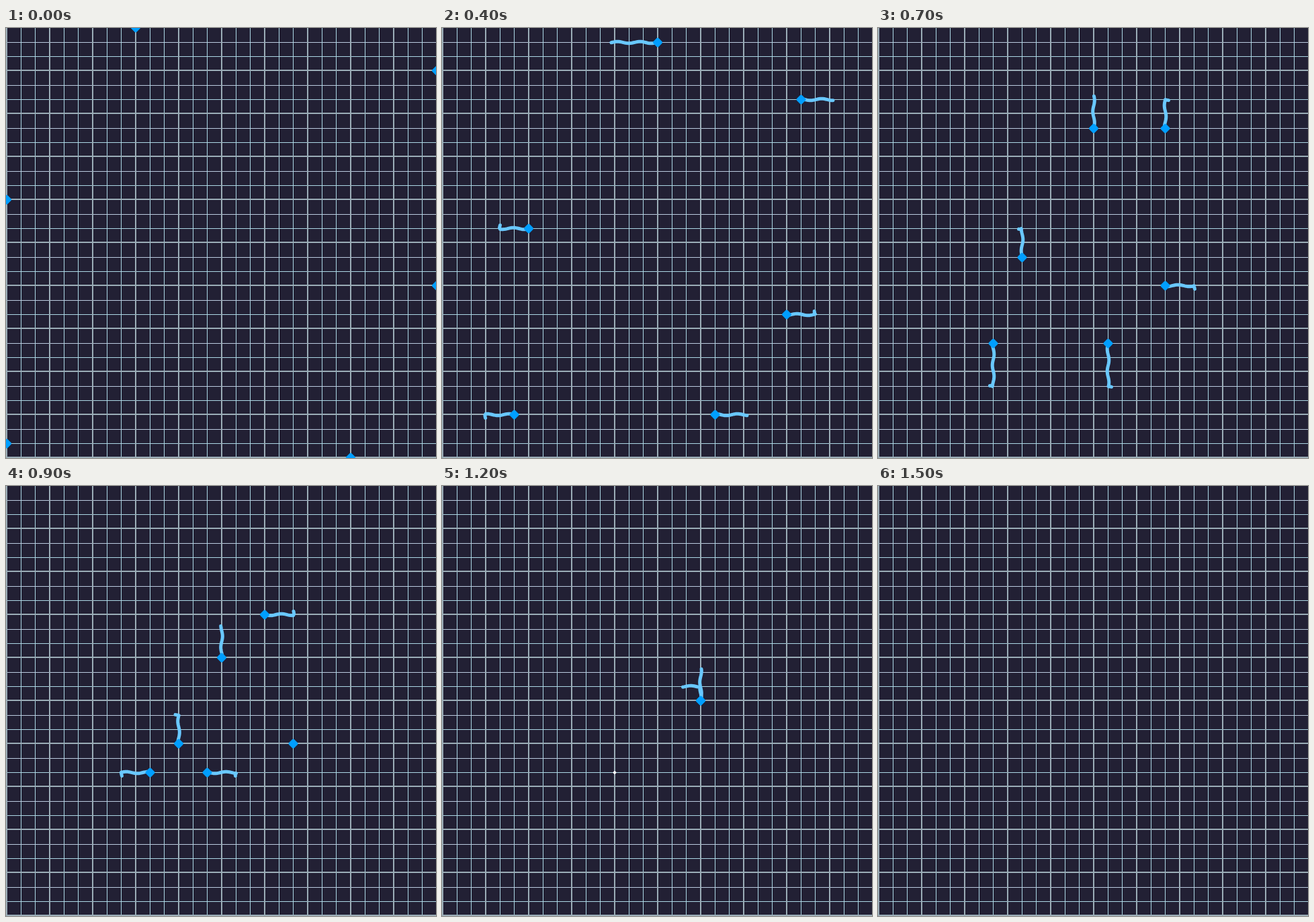
An HTML page with a canvas for the animation above (1600 ms loop, 640 px wide and 640 px high).

```html
<!DOCTYPE html>
<html>
<head>
<meta charset="utf-8">
<style>
html, body { margin: 0; overflow: hidden; background: #222034; }
canvas { display: block; }
</style>
</head>
<body>
<canvas id="stage" width="640" height="640"></canvas>
<script>
const ctx = document.getElementById('stage').getContext('2d');
const CELL = 64 / 3, STEP = 100, STEPS = 16;
const DIRS = { L: [-1, 0], R: [1, 0], U: [0, -1], D: [0, 1] };

// Start cell, one move per step, and the step at which the runner disappears.
const runners = [
  [9, 0, 'D1 R2 R1 R3 D2 D2 D2 D3 D2 D2 R2 R1D1', 13],
  [30, 3, 'D2 L1 L2 L2 L3 L2 D2 D2 L2 D2 D2 D2', 13],
  [0, 12, 'R2 R2 D2 R2 R2 R2 D2 R2 D2 D2', 11],
  [30, 18, 'L2 L2 D2 L2 L2 U2 L2', 10],
  [0, 29, 'R1 R2 U2 R2 U2 R3 U3 U2 R2 R2', 11],
  [24, 30, 'U3 L1 L2 L2 U2 L3 U3 U2 L2 L2', 11]
].map(([col, row, moves, end]) => {
  const points = [toPixel(col, row)];
  const heads = [0];
  for (const move of moves.split(' ')) {
    for (const [, dir, count] of move.matchAll(/([LRUD])(\d)/g)) {
      col += DIRS[dir][0] * count;
      row += DIRS[dir][1] * count;
      points.push(toPixel(col, row));
    }
    heads.push(points.length - 1);
  }
  return { points, heads, end };
});

// Column, row, first step, number of steps shown.
const sparks = [[20, 18, 10, 1], [12, 20, 11, 2], [18, 15, 13, 2]];

function toPixel(col, row) {
  return [
    Math.floor(col * CELL + 1e-6) + (col % 3 ? 1.5 : 1),
    Math.floor(row * CELL + 1e-6) + (row % 3 ? 0.5 : -0.5)
  ];
}

function drawGrid() {
  ctx.fillStyle = '#222034';
  ctx.fillRect(0, 0, 640, 640);
  for (let i = 0; i <= 30; i++) {
    if (i % 3 === 0) continue;
    const at = Math.floor(i * CELL);
    ctx.fillStyle = i % 3 === 1 ? '#bccbe0' : '#add8e6';
    ctx.fillRect(0, at, 640, 1);
    ctx.fillStyle = '#add8e6';
    ctx.fillRect(at + 1, 0, 1, 640);
  }
  ctx.fillStyle = '#9badb7';
  for (let at = 0; at <= 640; at += 64) {
    ctx.fillRect(0, at - 2, 640, 2);
    ctx.fillRect(at, 0, 2, 640);
  }
}

function diamond([x, y], size, round, color) {
  ctx.beginPath();
  ctx.moveTo(x, y - size);
  ctx.lineTo(x + size, y);
  ctx.lineTo(x, y + size);
  ctx.lineTo(x - size, y);
  ctx.closePath();
  ctx.fillStyle = ctx.strokeStyle = color;
  ctx.lineWidth = round * 2;
  ctx.fill();
  ctx.stroke();
}

function drawTrail({ points, heads }, step, seed) {
  const path = points.slice(heads[step - 1], heads[step] + 1);
  const before = points[heads[step - 1] - 1];
  if (before) {
    const [x, y] = path[0], dx = before[0] - x, dy = before[1] - y;
    const k = 5 / Math.hypot(dx, dy);
    path.unshift([x + dx * k, y + dy * k]);
  }
  ctx.beginPath();
  let travelled = 0;
  for (let i = 1; i < path.length; i++) {
    const [ax, ay] = path[i - 1], [bx, by] = path[i];
    const length = Math.hypot(bx - ax, by - ay);
    const ux = (bx - ax) / length, uy = (by - ay) / length;
    for (let d = 0; d <= length; d += 2) {
      const wave = 1.3 * Math.sin((travelled + d) * 0.19 + seed * 1.7 + step * 2.3);
      ctx.lineTo(ax + ux * d - uy * wave, ay + uy * d + ux * wave);
    }
    travelled += length;
  }
  ctx.strokeStyle = '#69c8ff';
  ctx.lineWidth = 5;
  ctx.stroke();
}

function draw(step) {
  ctx.lineCap = ctx.lineJoin = 'round';
  drawGrid();
  const active = runners.filter(r => step < r.end);
  active.forEach(r => {
    if (step > 0 && step < r.heads.length) drawTrail(r, step, runners.indexOf(r));
  });
  active.forEach(r => {
    const last = Math.min(step, r.heads.length - 1);
    diamond(r.points[r.heads[last]], 5, 2, '#009eff');
  });
  for (const [col, row, start, count] of sparks) {
    const age = step - start;
    if (age >= 0 && age < count) diamond(toPixel(col, row), age ? 1.5 : 2.5, 1, '#fff');
  }
}

const origin = performance.now();
function tick() {
  draw(Math.floor((performance.now() - origin) / STEP) % STEPS);
  requestAnimationFrame(tick);
}
tick();
</script>
</body>
</html>
```
